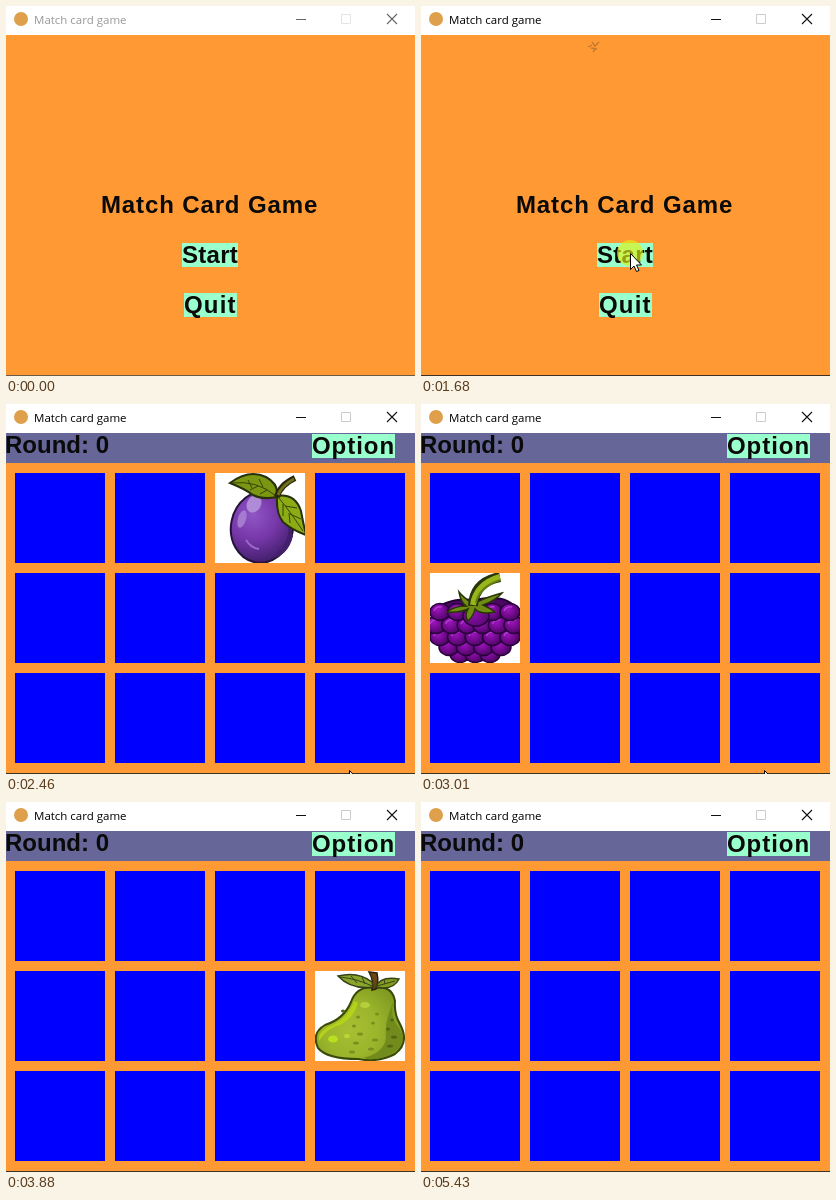
These frames come from a looping animation (409x370 px, 6150 ms). An HTML page with a canvas:

```html
<!DOCTYPE html>
<html lang="en">
<head>
<meta charset="utf-8">
<title>Match card game</title>
<style>
  html, body { margin: 0; width: 100%; height: 100%; overflow: hidden; background: #fff; }
  canvas { display: block; }
</style>
</head>
<body>
<canvas id="stage" width="409" height="370"></canvas>
<script>
const ctx = document.getElementById('stage').getContext('2d');
const LOOP = 6150, ORANGE = '#ff9933', MINT = '#99ffcc';
const GAME_START = 1760;
// Moments at which each of the twelve cards is turned back over.
const flipTimes = [2080, 2387, 2690, 3010, 3330, 3560, 3880, 4180, 4500, 4810, 5130, 5430];

function rect(x, y, w, h, color) {
  ctx.fillStyle = color;
  ctx.fillRect(x, y, w, h);
}

function shape(d, fill, stroke, width = 1.5) {
  const path = new Path2D(d);
  if (fill) { ctx.fillStyle = fill; ctx.fill(path); }
  if (stroke) { ctx.strokeStyle = stroke; ctx.lineWidth = width; ctx.stroke(path); }
}

function oval(x, y, rx, ry, fill, stroke, angle = 0, width = 1.5) {
  ctx.beginPath();
  ctx.ellipse(x, y, rx, ry, angle, 0, 2 * Math.PI);
  if (fill) { ctx.fillStyle = fill; ctx.fill(); }
  if (stroke) { ctx.strokeStyle = stroke; ctx.lineWidth = width; ctx.stroke(); }
}

function glow(x, y, r, ...colors) {
  const g = ctx.createRadialGradient(x, y, 0, x, y, r);
  colors.forEach((c, i) => g.addColorStop(i / (colors.length - 1), c));
  return g;
}

function text(str, x, y, spacing = 0) {
  ctx.font = 'bold 24px "Liberation Sans", Arial, sans-serif';
  ctx.letterSpacing = spacing + 'px';
  ctx.fillStyle = '#0a0a0a';
  ctx.fillText(str, x, y);
  ctx.letterSpacing = '0px';
}

function button(label, x, y, w, spacing) {
  rect(x, y, w, 24, MINT);
  text(label, x, y + 20, spacing);
}

function plum() {
  const line = '#241238';
  oval(47, 54, 31, 36, glow(38, 42, 50, '#9056c4', '#7637a8', '#3f1d68'), line, 0.2, 2);
  shape('M72 45Q79 70 54 86Q73 84 78 63Z', '#43206c');
  oval(39, 31, 7, 9, '#b08bd8', null, 0.5);
  oval(27, 46, 4, 9, '#a57bd0', null, 0.3);
  shape('M31 67Q36 75 44 76', null, '#9a6acc', 2);
  shape('M15 10Q34 -4 51 4Q64 11 62 24Q48 27 38 22Q30 16 15 10Z', '#7b9610', '#26300a', 2);
  shape('M17 10Q42 7 61 23M33 7L37 15M44 6L48 14M35 17L43 13M45 21L52 17', null, '#35450c', 1);
  shape('M62 23Q80 20 86 38Q88 49 91 62Q77 57 68 49Q61 41 62 23Z', '#8cab14', '#26300a', 2);
  shape('M63 24Q74 37 88 58M70 33L82 35M75 41L86 46M68 31L68 43M74 40L75 50', null, '#35450c', 1);
  shape('M62 24Q65 12 80 5', null, '#2a260b', 6);
  shape('M63 22Q67 12 79 6', null, '#70701c', 3);
}

function raspberry() {
  const line = '#27003a';
  shape('M4 38Q18 24 44 27Q78 20 87 37Q94 58 79 74Q59 89 45 88Q24 86 11 71Q-3 55 4 38Z', '#4c0762', line, 2);
  const rows = [[81, 3, 15], [74, 4, 26], [64, 5, 35], [52, 6, 39], [39, 5, 35]];
  for (const [y, count, half] of rows) {
    for (let i = 0; i < count; i++) {
      const x = 45 - half + 2 * half * i / (count - 1);
      oval(x, y, 10, 8.5, glow(x - 2, y - 3, 12, '#9b16bd', '#790b94', '#4c0762'), line);
      shape(`M${x - 6} ${y - 1}Q${x - 4} ${y - 6} ${x + 2} ${y - 5}`, null, '#b63bd4', 1.5);
    }
  }
  oval(46, 43, 13, 10, glow(43, 39, 15, '#8e12ab', '#63087d'), line);
  shape('M43 31Q33 24 29 19Q31 30 36 33Q24 33 17 39Q30 40 38 36Q34 43 38 48Q44 42 45 36Q51 42 65 39Q60 35 53 32Q65 28 72 20Q57 24 47 29Z',
    '#6f8d13', '#283508', 1.5);
  shape('M43 33Q44 9 70 4', null, '#283508', 10);
  shape('M43 32Q46 11 70 4', null, '#98b51c', 6);
  shape('M46 30Q49 14 70 7', null, '#66810f', 2);
}

function pear() {
  const line = '#394907';
  shape('M36 31Q42 14 60 17Q77 14 80 30Q79 43 85 53Q95 72 80 83Q63 92 43 88Q12 88 3 77Q-4 62 10 54Q29 48 36 31Z',
    glow(36, 58, 54, '#a7bf32', '#9bb52c', '#7d981f'), line, 2);
  shape('M78 31Q75 48 84 57Q94 72 78 82Q63 91 48 87Q69 82 71 67Q70 55 73 45Z', '#718b1c');
  shape('M39 30Q32 49 13 56Q2 62 4 70Q12 57 25 54Q39 47 43 32Z', '#b3d219');
  oval(18, 68, 5, 3.5, '#b9df20');
  oval(32, 65, 3, 2, '#b9d834');
  oval(50, 34, 5, 3, '#b5cf3b');
  for (let i = 0; i < 14; i++) {
    oval(28 + i * 17 % 53, 40 + i * 23 % 43, 2 + i % 2, 1.6, i % 3 ? '#78901d' : '#526811');
  }
  shape('M57 19Q59 10 54 1L62 2Q64 12 61 18Z', '#694714', '#2d230b');
  shape('M58 16Q36 19 23 5Q43 0 57 11Z', '#8ba52c', '#354317');
  shape('M61 16Q65 5 84 8Q78 20 61 16Z', '#839d20', '#354317');
  shape('M25 6Q43 8 57 15M36 5L42 12M47 6L50 13M62 15L80 10M69 8L70 13', null, '#354317', 1);
}

function strawberry() {
  const line = '#3c0a08';
  shape('M22 26Q37 16 57 25Q75 36 74 55Q73 69 58 78Q34 87 14 90Q-2 88 2 72Q6 42 22 26Z',
    glow(29, 43, 57, '#ee2020', '#d31010', '#9b0909'), line, 2);
  shape('M73 48Q75 70 53 78Q34 86 13 88Q7 88 4 84Q39 82 54 71Q68 63 73 48Z', '#8c0909');
  const seeds = [[25, 33], [42, 30], [59, 36], [18, 46], [34, 46], [50, 48], [67, 48], [12, 60],
    [28, 60], [44, 63], [60, 61], [9, 75], [23, 76], [38, 77], [53, 73], [14, 86]];
  for (const [x, y] of seeds) {
    oval(x, y, 4, 3.3, '#4b130a', null, -0.5);
    oval(x, y, 2.4, 1.8, '#c49642', null, -0.5);
  }
  shape('M28 26Q39 20 48 24', null, '#f66c50', 2);
  const leaf = '#83a514', edge = '#344009';
  shape('M52 30Q40 20 45 10L50 1Q60 13 57 30Z', leaf, edge);
  shape('M55 31Q57 13 76 9Q78 24 59 36Z', leaf, edge);
  shape('M56 31Q75 23 90 39Q72 45 57 37Z', leaf, edge);
  shape('M57 34Q43 34 43 22Q52 22 59 33Q63 37 62 42Z', '#69870f', edge);
  shape('M50 6L54 28M73 12L57 31M85 38Q71 31 58 34', null, '#526a0c', 1);
}

const deck = [pear, strawberry, plum, strawberry, raspberry, plum,
  raspberry, pear, plum, strawberry, pear, raspberry];

function titleBar(active) {
  rect(0, 0, 409, 29, '#fff');
  oval(15, 13, 7, 7, '#dfa04c');
  ctx.font = '11.5px "Open Sans", "Noto Sans", sans-serif';
  ctx.fillStyle = active ? '#000' : '#999';
  ctx.fillText('Match card game', 28, 18);
  const ink = active ? '#111' : '#666';
  rect(290, 13, 10, 1, ink);
  shape('M335.5 8.5h9v9h-9Z', null, active ? '#ccc' : '#e4e4e4', 1);
  shape('M381 8L391 18M391 8L381 18', null, ink, 1.1);
}

function menu(t) {
  if (t >= 610) {
    shape('M167 41l4 -2M171 36l3 4l4 -4M170 42l6 1M172 46l3 -4', null, 'rgba(130,90,50,.5)', 1.3);
  }
  text('Match Card Game', 95, 207, 0.87);
  button('Start', 176, 237, 56, 0.27);
  button('Quit', 178, 287, 53, 1.2);
}

function game(t) {
  rect(0, 29, 409, 30, '#666699');
  text('Round: 0', -1, 49);
  button('Option', 306, 30, 83, 0.95);
  const open = flipTimes.findIndex(end => t < end);
  deck.forEach((fruit, i) => {
    const x = 9 + 100 * (i % 4), y = 69 + 100 * Math.floor(i / 4);
    rect(x, y, 90, 90, i === open ? '#fff' : '#0000ff');
    if (i !== open) return;
    ctx.save();
    ctx.translate(x, y);
    ctx.beginPath();
    ctx.rect(0, 0, 90, 90);
    ctx.clip();
    fruit();
    ctx.restore();
  });
}

// The pointer moves in discrete, eased steps.
function glide(t, start, end, steps, from, to) {
  const step = Math.floor((t - start) / (end - start) * steps + 1e-6);
  const p = Math.min(1, Math.max(0, step / steps));
  const e = p * p * (3 - 2 * p);
  return from.map((v, i) => Math.round(v + (to[i] - v) * e));
}

function pointer(t) {
  if (t < 70 || t >= 3710) return;
  const entry = [282, 222], top = [179, 34], start = [209, 247], rest = [343, 366];
  const [x, y] = t < 990 ? glide(t, 70, 533, 6, entry, top)
    : t < 2080 ? glide(t, 990, 1380, 5, top, start)
    : glide(t, 2080, 2460, 5, start, rest);
  const pressed = t >= 610 && t < 990 || t >= 1680 && t < 2080;
  if (pressed) oval(x, y, 13, 13, 'rgba(225,240,20,.65)');
  ctx.save();
  ctx.translate(x + 0.5, y + 0.5);
  shape('M0 0V16L3.5 12.5L6 18L8.5 17L6 11.5H11Z', '#fff', '#000', 1);
  ctx.restore();
}

function draw(now) {
  const t = now % LOOP;
  const active = t >= 760;
  rect(0, 29, 409, 341, ORANGE);
  titleBar(active);
  if (t < GAME_START) menu(t);
  else game(t);
  rect(0, 369, 409, 1, active ? '#3d3226' : '#6b5a48');
  pointer(t);
  requestAnimationFrame(() => draw(performance.now() - began));
}

const began = performance.now();
draw(0);
</script>
</body>
</html>
```
